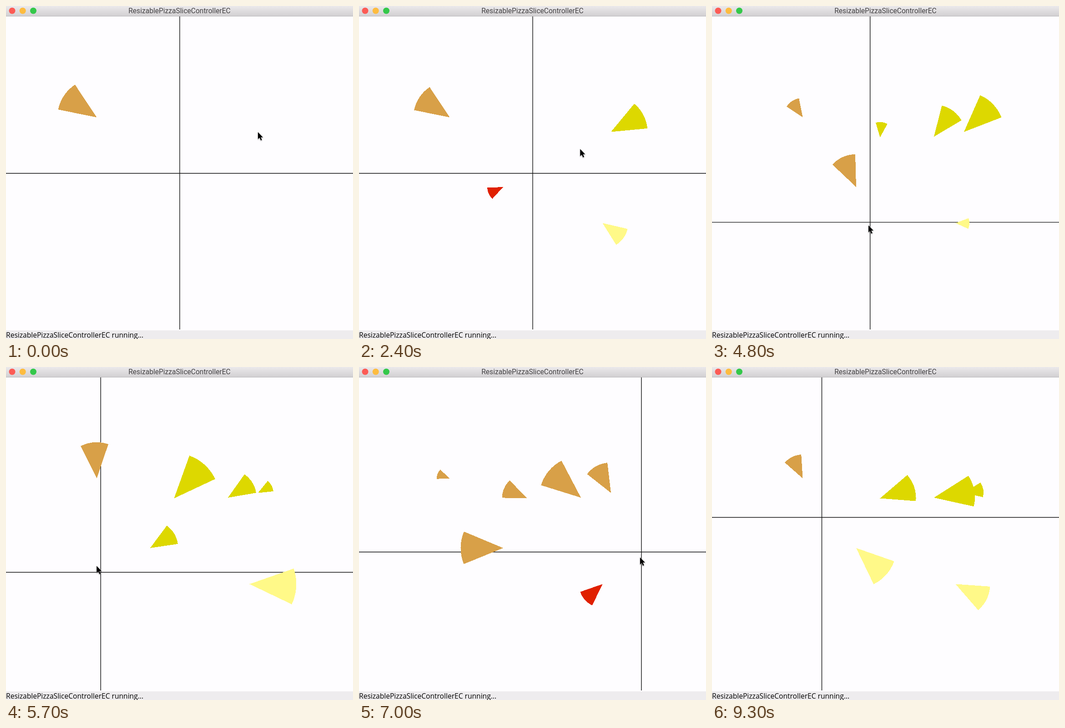
These frames come from a looping animation (763 by 734 pixels, 9.4 s). An HTML page:

```html
<!DOCTYPE html>
<html lang="en">
<head>
<meta charset="utf-8">
<title>Pizza slices</title>
<style>
  html, body { margin: 0; width: 100%; height: 100%; overflow: hidden; background: #fefdff; }
  svg { display: block; width: 763px; height: 734px; }
  .title { font: 15.6px Roboto, sans-serif; fill: #454345; text-anchor: middle; }
  .status { font: 15.6px "Open Sans", sans-serif; fill: #000; }
  .slice { shape-rendering: crispEdges; }
  #pointer { filter: drop-shadow(0 1px 1px rgba(0, 0, 0, .35)); }
</style>
</head>
<body>
<svg viewBox="0 0 763 734">
  <defs>
    <linearGradient id="bar" x1="0" y1="0" x2="0" y2="1">
      <stop offset="0" stop-color="#ebe9eb"/>
      <stop offset="1" stop-color="#d2d0d2"/>
    </linearGradient>
  </defs>
  <rect width="763" height="734" fill="#fefdff"/>
  <g stroke="#111" stroke-width="1.4">
    <line id="vertical" y1="23" y2="713"/>
    <line id="horizontal" x2="763"/>
  </g>
  <g id="slices"></g>
  <rect width="763" height="22" fill="url(#bar)"/>
  <rect y="22" width="763" height="1" fill="#b9b7b9"/>
  <circle cx="13.5" cy="10.5" r="7" fill="#fc5b55"/>
  <circle cx="36.7" cy="10.5" r="7" fill="#fdbc40"/>
  <circle cx="60" cy="10.5" r="7" fill="#34c84a"/>
  <text class="title" x="381.5" y="16">ResizablePizzaSliceControllerEC</text>
  <rect y="715" width="763" height="19" fill="#eeecee"/>
  <text class="status" x="0" y="730.5">ResizablePizzaSliceControllerEC running...</text>
  <path id="pointer" d="M0 0V15.6L3.6 12.3 6.2 18.3 8.8 17.2 6.2 11.4H11Z"
        fill="#000" stroke="#fff" stroke-width="1" paint-order="stroke"/>
</svg>
<script>
  const LOOP = 9400, STEP = 100;
  const MIN = 25, SPAN = 78;
  const HALF = Math.PI / 8;
  const LAG = 40;

  const DRAG_START = 4000, DRAG_END = 8900;

  // time, x, y, and the distance covered in one LAG
  const mouse = [
    [0, 554, 278], [110, 554, 278], [650, 317, 399], [1000, 536, 477],
    [1200, 536, 477], [1550, 470, 576], [2600, 488, 288], [3060, 369, 289],
    [3500, 404, 381], [DRAG_START, 382, 368.7], [5700, 208.3, 452.5, -9, -14],
    [7000, 621, 407.7, -3, 12], [7700, 394.5, 502.2, -4, -23],
    [DRAG_END, 241.5, 331.5], [LOOP, 241.5, 331.5]
  ];

  // total radius change over time
  const growth = [
    [0, 0], [1200, 99], [3500, 284], [5700, 461], [7000, 566], [7700, 623], [LOOP, 753.7]
  ];

  const slices = [
    { x: 199.5, y: 245.5, phase: 61.5, born: 0 },
    { x: 554, y: 277.5, phase: 16, born: 100 },
    { x: 317, y: 399, phase: 126.5, born: 700 },
    { x: 535.5, y: 478.5, phase: 85, born: 1200 },
    { x: 369.5, y: 289.5, phase: 88, born: 3100 },
    { x: 488, y: 288, phase: 125, born: 2600 }
  ];

  const $ = id => document.getElementById(id);
  const vertical = $('vertical'), horizontal = $('horizontal'), pointer = $('pointer');

  for (const s of slices) {
    s.el = document.createElementNS(pointer.namespaceURI, 'path');
    s.el.setAttribute('class', 'slice');
    $('slices').append(s.el);
  }

  function set(el, attrs) {
    for (const name in attrs) el.setAttribute(name, attrs[name]);
  }

  function segment(keys, t) {
    let i = 0;
    while (i < keys.length - 2 && t >= keys[i + 1][0]) i++;
    const a = keys[i], b = keys[i + 1], span = b[0] - a[0];
    return { a, b, span, u: (t - a[0]) / span };
  }

  function grown(t) {
    const { a, b, u } = segment(growth, t);
    return a[1] + (b[1] - a[1]) * u;
  }

  // Hermite curve: place and distance per LAG
  function track(t) {
    const { a, b, span, u } = segment(mouse, t);
    const k = span / LAG, u2 = u * u, u3 = u2 * u;
    const axis = n => {
      const p = a[n], q = b[n], m = (a[n + 2] || 0) * k, w = (b[n + 2] || 0) * k;
      return [
        p + (q - p) * (3 * u2 - 2 * u3) + m * (u3 - 2 * u2 + u) + w * (u3 - u2),
        ((q - p) * 6 * (u - u2) + m * (3 * u2 - 4 * u + 1) + w * (3 * u2 - 2 * u)) / k
      ];
    };
    const [x, vx] = axis(1), [y, vy] = axis(2);
    return { x, y, vx, vy };
  }

  function color(s, hub) {
    const left = s.x < hub.x;
    if (s.y < hub.y) return left ? '#d8a048' : '#ddd800';
    return left ? '#e02000' : '#fff988';
  }

  function wedge(s, hub, r) {
    const mid = Math.atan2(s.y - hub.y, s.x - hub.x);
    const rim = a => `${s.x + r * Math.cos(a)} ${s.y + r * Math.sin(a)}`;
    return `M${s.x} ${s.y}L${rim(mid - HALF)}A${r} ${r} 0 0 1 ${rim(mid + HALF)}Z`;
  }

  function draw(t) {
    const dragging = t >= DRAG_START;
    const p = track(t);
    const center = dragging ? p : track(DRAG_START);
    const lead = dragging ? 1 : 0;

    // the slices trail the lines, the lines trail the pointer
    const hub = { x: center.x - lead * p.vx * .6, y: center.y - lead * p.vy * .6 };

    set(vertical, { x1: center.x, x2: center.x });
    set(horizontal, { y1: center.y, y2: center.y });

    const total = grown(t);
    for (const s of slices) {
      const wave = (total + s.phase) % (2 * SPAN);
      const r = MIN + SPAN - Math.abs(wave - SPAN);
      set(s.el, {
        d: wedge(s, hub, r),
        fill: color(s, hub),
        visibility: t >= s.born ? 'visible' : 'hidden'
      });
    }

    set(pointer, {
      transform: `translate(${p.x + lead * p.vx} ${p.y + lead * p.vy})`,
      visibility: t < DRAG_END + STEP ? 'visible' : 'hidden'
    });
  }

  const start = performance.now();
  function tick() {
    const t = (performance.now() - start) % LOOP;
    draw(Math.floor(t / STEP) * STEP);
    requestAnimationFrame(tick);
  }
  tick();
</script>
</body>
</html>
```
